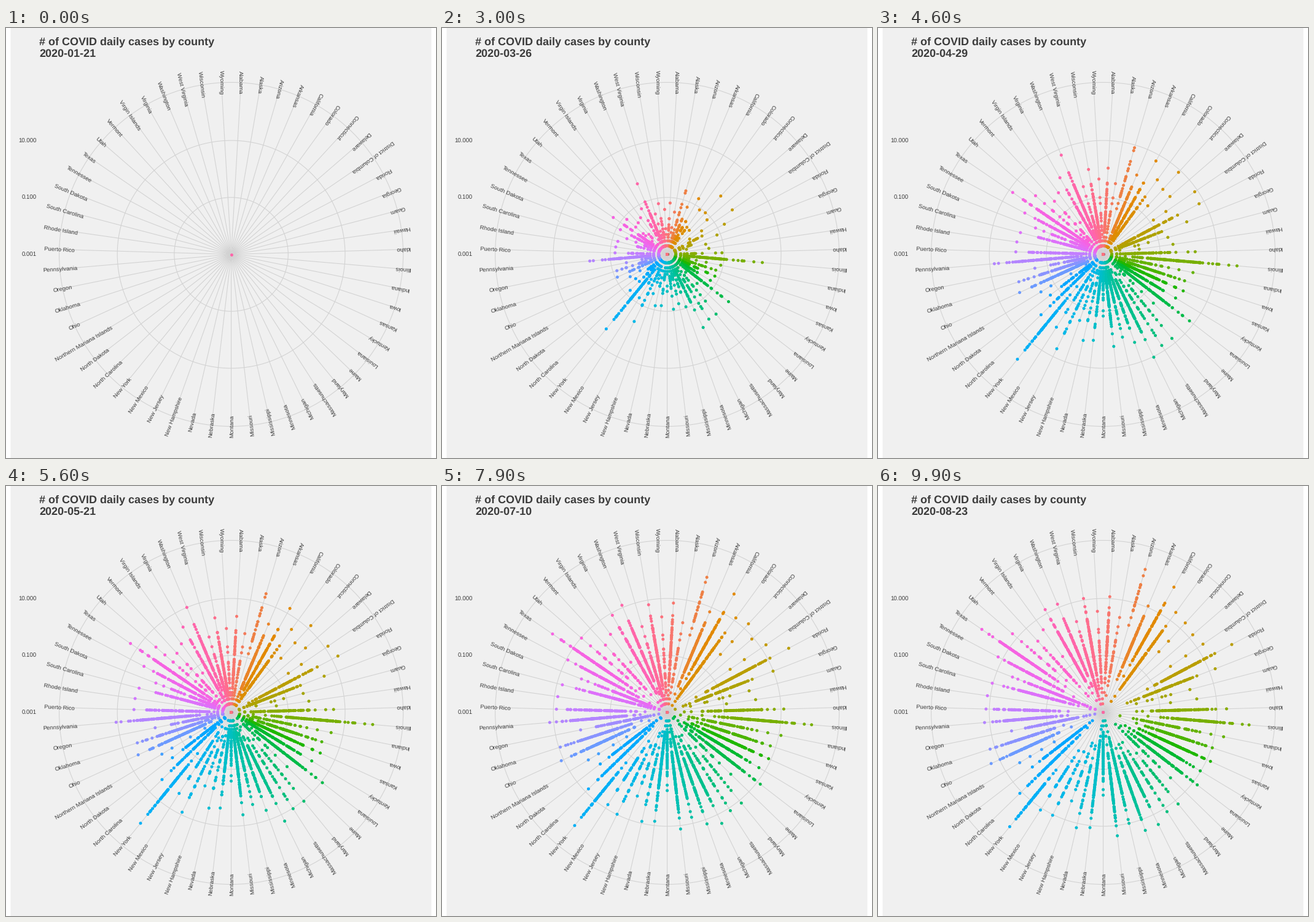
A matplotlib script that plays this animation: 700x700 px, repeating every 10000 ms.

```python
import matplotlib.pyplot as plt
import numpy as np
from matplotlib.animation import FuncAnimation
from matplotlib.patches import Circle, Rectangle

SIZE, DPI, FRAMES, DAYS = 700, 100, 100, 215
PT = 72 / DPI
CX, CY, RIM = 366.6, 368.5, 280
DECADE = 46.35  # pixels per factor of ten
INK, GRID, PANEL = "#3C3C3C", "#D2D2D2", "#F0F0F0"


def names(text):
    return " ".join(text.split()).replace(", ", ",").split(",")


STATES = names("""Alabama, Alaska, Arizona, Arkansas, California, Colorado,
    Connecticut, Delaware, District of Columbia, Florida, Georgia, Guam,
    Hawaii, Idaho, Illinois, Indiana, Iowa, Kansas, Kentucky, Louisiana,
    Maine, Maryland, Massachusetts, Michigan, Minnesota, Mississippi,
    Missouri, Montana, Nebraska, Nevada, New Hampshire, New Jersey,
    New Mexico, New York, North Carolina, North Dakota,
    Northern Mariana Islands, Ohio, Oklahoma, Oregon, Pennsylvania,
    Puerto Rico, Rhode Island, South Carolina, South Dakota, Tennessee,
    Texas, Utah, Vermont, Virgin Islands, Virginia, Washington,
    West Virginia, Wisconsin, Wyoming""")
N = len(STATES)
THETA = (np.arange(N) + 0.5) * 2 * np.pi / N

# Groups that set how many counties a state has, how far and how early it grows
LARGE = names("Arizona, California, Florida, Illinois, New York, Texas")
MILD = names("""Alaska, Guam, Hawaii, Maine, Montana, New Hampshire,
    North Dakota, Northern Mariana Islands, Oregon, South Dakota, Vermont,
    Virgin Islands, West Virginia, Wyoming""")
SPARSE = names("""Connecticut, Delaware, District of Columbia, Guam, Hawaii,
    Northern Mariana Islands, Rhode Island, Virgin Islands""")
MEDIUM = names("""Alaska, Arizona, Maine, Maryland, Massachusetts, Nevada,
    New Hampshire, New Jersey, New Mexico, Utah, Vermont, Wyoming""")
EARLY = names("""Connecticut, District of Columbia, Illinois, Louisiana,
    Maryland, Massachusetts, Michigan, New Jersey, New York, Pennsylvania,
    Washington""")
FIRST = names("""Washington, Illinois, California, Arizona, Massachusetts,
    Wisconsin""")
OUTBREAK = names("California, New York, Washington")

# Share of the final radius reached by a state's worst county
STEPS = [17, 21, 28, 37, 56, 70, 79, 99]
USUAL = [-0.3, -0.1, 0.38, 0.67, 0.83, 0.905, 0.945, 1]
AHEAD = [-0.3, 0.13, 0.59, 0.87, 0.97, 0.985, 0.99, 1]


def hue_color(k):
    """Evenly spaced hue at luminance 65 and chroma 100 (CIE LUV)."""
    h, lum, chroma = np.radians(15 + 360 * k / N), 65, 100
    y = ((lum + 16) / 116) ** 3
    u = chroma * np.cos(h) / (13 * lum) + 0.1978
    v = chroma * np.sin(h) / (13 * lum) + 0.4683
    x = 9 * y * u / (4 * v)
    z = y * (12 - 3 * u - 20 * v) / (4 * v)
    rgb = np.array([[3.2405, -1.5371, -0.4985],
                    [-0.9693, 1.8760, 0.0416],
                    [0.0556, -0.2040, 1.0572]]) @ [x, y, z]
    rgb = np.clip(rgb, 0, 1)
    return np.where(rgb > 0.0031308,
                    1.055 * rgb ** (1 / 2.4) - 0.055, 12.92 * rgb)


def county_count(name, rng):
    if name in SPARSE:
        return rng.integers(1, 8)
    if name in MEDIUM:
        return rng.integers(14, 30)
    return rng.integers(50, 115)


def final_radius(name, rng):
    if name in LARGE:
        return rng.normal(240, 5)
    return rng.normal(152, 10) if name in MILD else rng.normal(194, 7)


def county_gaps(count, rng):
    """Distance of each county behind the worst one, near log-normal."""
    p = 1 - (np.arange(count) + 0.5) / count
    z = (p ** 0.135 - (1 - p) ** 0.135) / 0.1975
    gaps = rng.uniform(24, 33) * (z[0] - z) + rng.exponential(7)
    gaps = np.maximum(gaps + rng.normal(0, 4, count), 3)
    gaps[0] = 0
    return gaps


def growth(name):
    curve = list(AHEAD if name in EARLY else USUAL)
    if name in FIRST:
        curve[:2] = 0, max(curve[1], 0.02)
    if name in OUTBREAK:
        curve[1] = 0.35
    return curve


def leader(k, t):
    """Radius of the worst county of state k at step t."""
    name = STATES[k]
    if name in FIRST and t < 1.4 * FIRST.index(name):
        return -RIM
    return top_radius[k] * np.interp(t, STEPS, curves[k])


rng = np.random.default_rng(21)
counts = [county_count(s, rng) for s in STATES]
top_radius = [final_radius(s, rng) for s in STATES]
curves = [growth(s) for s in STATES]
owner = np.repeat(np.arange(N), counts)
gap = np.concatenate([county_gaps(c, rng) for c in counts])
drift = rng.normal(0, 6, len(gap))
colors = np.array([hue_color(k) for k in range(N)])[owner]
direction = np.column_stack([np.sin(THETA), -np.cos(THETA)])[owner]

plt.rcParams.update({"font.family": "Liberation Sans", "text.hinting": "none",
                     "text.color": INK})
fig = plt.figure(figsize=(SIZE / DPI, SIZE / DPI), dpi=DPI, facecolor="white")
ax = fig.add_axes([0, 0, 1, 1])
ax.set(xlim=(0, SIZE), ylim=(SIZE, 0))
ax.axis("off")

ax.add_patch(Rectangle((7.5, -2), 685, SIZE + 4, fc=PANEL, ec="none",
                       snap=False, zorder=0))
for k, a in enumerate(THETA):
    x, y = CX + RIM * np.sin(a), CY - RIM * np.cos(a)
    ax.plot([CX, x], [CY, y], color=GRID, lw=1.07 * PT, snap=False, zorder=1)
    ax.text(x, y, STATES[k], size=9.5 * PT, rotation=270 - 360 * k / (N - 1),
            rotation_mode="anchor", ha="center", va="center_baseline")
for r in (2 * DECADE, 4 * DECADE, RIM):
    ax.add_patch(Circle((CX, CY), r, fc="none", ec=GRID, lw=1.07 * PT,
                        zorder=1))
for k, label in enumerate(["0.001", "0.100", "10.000"]):
    ax.text(50.2, CY - 2 * k * DECADE + 3.4, label, size=9.6 * PT, ha="right")

ax.text(54.5, 27.2, "# of COVID daily cases by county", size=18 * PT,
        weight="bold")
date = ax.text(54.5, 46.6, "", size=18 * PT, weight="bold")
dots = ax.scatter([], [], s=(5 * PT) ** 2, linewidths=0, zorder=2)


def update(t):
    day = np.datetime64("2020-01-21") + t * DAYS // (FRAMES - 1)
    date.set_text(str(day))
    left = 1 - np.clip((t - 37) / 62, 0, 1)
    top = np.array([leader(k, t) for k in range(N)])[owner]
    behind = np.where(gap > 0,
                      np.maximum(gap * (1 + 0.25 * left) + drift * left, 2), 0)
    cases = np.rint(10 ** ((top - behind) / DECADE))
    seen = cases >= 1
    radius = DECADE * np.log10(cases[seen])
    dots.set_offsets([CX, CY] + direction[seen] * radius[:, None])
    dots.set_facecolors(colors[seen])
    return dots, date


anim = FuncAnimation(fig, update, frames=FRAMES, interval=100, repeat=True,
                     repeat_delay=0)
plt.show()
```
